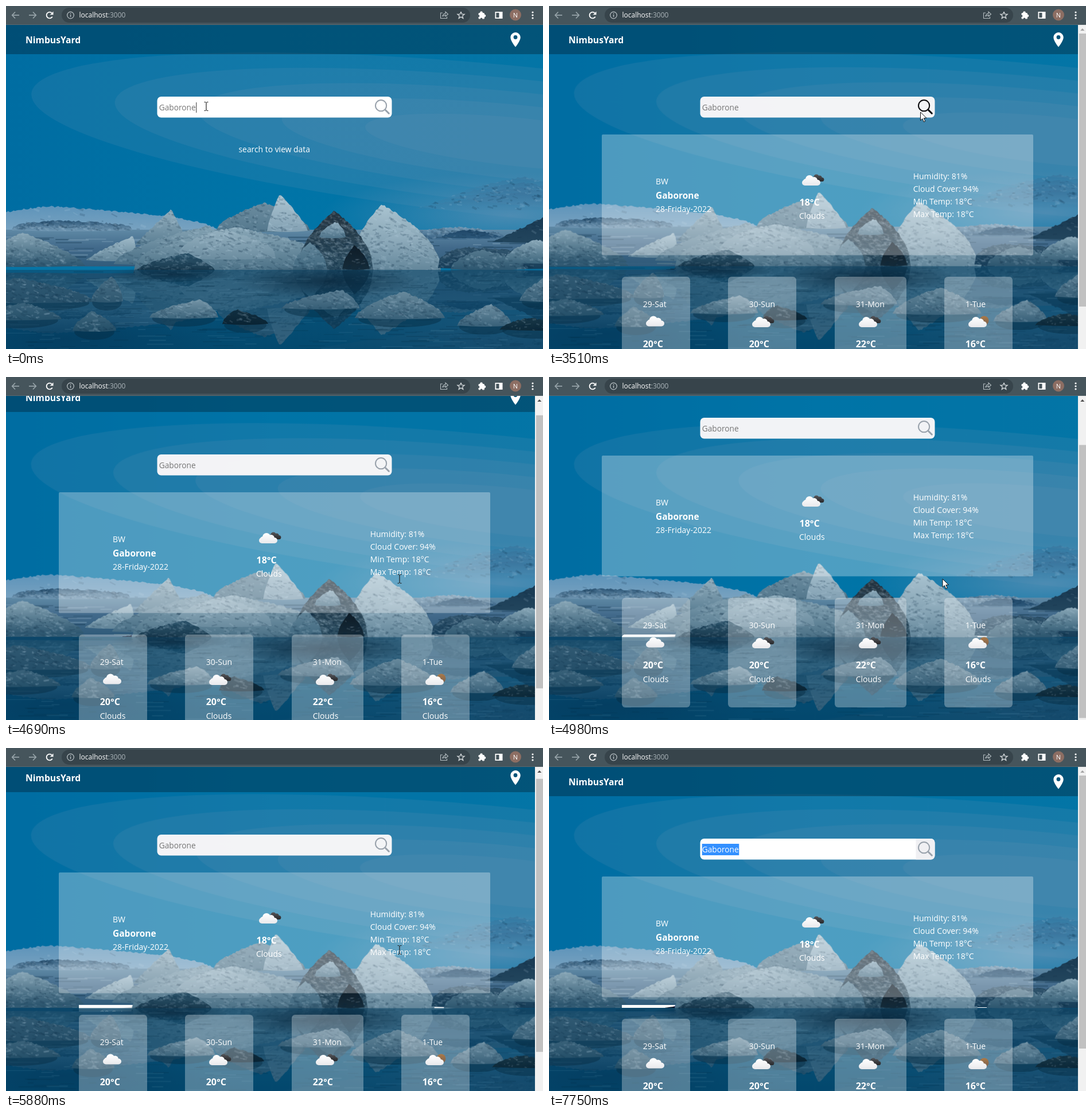
These frames come from a looping animation (936 px wide and 598 px high, 8 s). An HTML page with a canvas:

```html
<!DOCTYPE html>
<html lang="en">
<head>
<meta charset="utf-8">
<title>Weather search</title>
<style>
html, body { margin: 0; width: 100%; height: 100%; overflow: hidden; background: #0674a5; }
canvas { display: block; width: 100vw; height: 100vh; }
</style>
</head>
<body>
<canvas id="stage" width="936" height="598"></canvas>
<script>
const W = 936, H = 598, BAR = 33, LOOP = 8000, STEP = 120;
const stage = document.getElementById('stage').getContext('2d');
const FONT = '"Open Sans", "Noto Sans", sans-serif';
let c = stage;

// ---------- helpers ----------
let seed = 7;
const rnd = () => (seed = (seed * 16807) % 2147483647) / 2147483647;

function grad(x0, y0, x1, y1, ...colors) {
  const g = c.createLinearGradient(x0, y0, x1, y1);
  colors.forEach((col, i) => g.addColorStop(i / (colors.length - 1), col));
  return g;
}
function rect(x, y, w, h, fill, r = 0) {
  c.fillStyle = fill;
  c.beginPath();
  c.roundRect(x, y, w, h, r);
  c.fill();
}
function disc(x, y, r, fill) {
  c.fillStyle = fill;
  c.beginPath();
  c.arc(x, y, r, 0, 7);
  c.fill();
}
function ring(x, y, r, color, width, from = 0, to = 7) {
  c.strokeStyle = color;
  c.lineWidth = width;
  c.beginPath();
  c.arc(x, y, r, from, to);
  c.stroke();
}
function oval(x, y, rx, ry, fill, tilt = 0) {
  c.fillStyle = fill;
  c.beginPath();
  c.ellipse(x, y, rx, ry, tilt, 0, 7);
  c.fill();
}
function text(s, x, y, size = 14, fill = '#fff', weight = 400, align = 'left') {
  c.font = `${weight} ${size}px ${FONT}`;
  c.textAlign = align;
  c.fillStyle = fill;
  c.fillText(s, x, y);
}
function trace(p) {
  c.beginPath();
  for (let i = 0; i < p.length; i += 2) c.lineTo(p[i], p[i + 1]);
}
function line(color, width, ...p) {
  c.strokeStyle = color;
  c.lineWidth = width;
  trace(p);
  c.stroke();
}
function poly(fill, ...p) {
  c.fillStyle = fill;
  trace(p);
  c.fill();
}

// ---------- landscape ----------
// Ice colour from deep water blue (0) to pale snow (1).
function tone(k) {
  const mix = (a, b) => Math.round(a + (b - a) * k);
  return `rgb(${mix(10, 188)},${mix(56, 211)},${mix(84, 223)})`;
}
const shade = k => typeof k === 'number' ? tone(k) : k;

// A rough hump rising from both ends of its base to the apex; bend < 1 rounds it.
function berg(x0, x1, base, ax, ay, bend, top, low, grain = 1) {
  c.save();
  c.beginPath();
  c.moveTo(x0, base);
  for (let x = x0; x <= x1; x += 3) {
    const u = x < ax ? (x - x0) / (ax - x0) : (x1 - x) / (x1 - ax);
    c.lineTo(x, base - (base - ay) * u ** bend + (rnd() - .5) * 3);
  }
  c.lineTo(x1, base);
  c.quadraticCurveTo((x0 + x1) / 2, base + 4, x0, base);
  c.fillStyle = grad(0, ay, 0, base, shade(top), shade(low));
  c.fill();
  c.clip();
  const n = grain * (x1 - x0) * (base - ay) / 45;
  for (let i = 0; i < n; i++) {
    const x = x0 + rnd() * (x1 - x0), y = ay + rnd() * (base - ay), s = 2 + rnd() * 8;
    line(rnd() < .45 ? 'rgba(200,222,234,.13)' : 'rgba(10,42,62,.16)', 1 + rnd() * 3,
      x, y, x + s, y + s * (rnd() - .3));
  }
  c.restore();
}
function glow(x, y, rx, ry, rgb, alpha) {
  c.save();
  c.translate(x, y);
  c.scale(rx, ry);
  const g = c.createRadialGradient(0, 0, 0, 0, 0, 1);
  g.addColorStop(0, `rgba(${rgb},${alpha})`);
  g.addColorStop(1, `rgba(${rgb},0)`);
  c.fillStyle = g;
  c.fillRect(-1, -1, 2, 2);
  c.restore();
}
function streaks(n, y0, y1, light, dark) {
  for (let i = 0; i < n; i++) {
    const x = rnd() * W - 20, y = y0 + rnd() * (y1 - y0);
    line(rnd() < .4 ? light : dark, 1 + rnd() * 1.5, x, y, x + 10 + rnd() * 45, y);
  }
}
function sky() {
  rect(0, 33, W, 420, grad(0, 0, W, 0, '#006da2', '#0074a7', '#0475a6'));
  for (let i = 0; i < 5; i++) {
    const k = 1 - .17 * i;
    oval(900, 238, 860 * k, 132 * k, 'rgba(108,146,180,.155)', .1);
  }
  glow(880, 365, 330, 75, '96,146,182', .75);
  for (let i = 0; i < 4; i++)
    berg(715 + i * 25, 1000, 354 - i * 9, 900, 325 - i * 9, .7, 'rgba(52,102,142,.35)', 'rgba(70,122,160,.15)', .3);
  berg(-80, 372, 402, 70, 349, .35, '#5e94ba', '#7fa6c2', .1);
}
function shore() {
  rect(0, 390, W, 64, grad(0, 390, 0, 454, '#5f89a5', '#41698a', '#315c7b'));
  berg(10, 220, 391, 95, 374, .3, '#2f5879', '#6c93af', 2);
  berg(690, 868, 405, 790, 385, .35, '#7298b3', '#3d6788', 2);
  berg(760, 862, 403, 805, 390, .6, '#1f4667', '#2a5577');
  berg(848, 1010, 411, 960, 358, 1, '#173750', '#22455d', .3);
  streaks(130, 402, 448, 'rgba(160,190,210,.3)', 'rgba(15,50,75,.4)');
}
function bergs() {
  berg(-70, 138, 453, 30, 395, .7, .72, .2);
  berg(140, 230, 443, 222, 401, .8, .85, .5);
  berg(224, 320, 416, 288, 354, 1, .78, .45);
  berg(366, 530, 392, 450, 343, .6, .55, .42);
  berg(455, 526, 392, 477, 327, .8, .92, .68);
  berg(188, 420, 450, 352, 383, .6, .7, .35);
  berg(222, 580, 466, 400, 386, .4, .72, .34);
  berg(300, 470, 440, 375, 390, .4, .78, .55);
  berg(222, 365, 465, 315, 431, .6, '#2e566d', '#16364a', 2);
  berg(600, 758, 461, 655, 346, .5, .9, .55);
  berg(606, 757, 461, 700, 389, .5, .82, .5);
  berg(508, 640, 461, 572, 357, .5, '#26343f', '#2f5266', 4);
  berg(500, 560, 461, 530, 412, .5, .5, .3);
  berg(546, 592, 403, 575, 376, .5, .75, .4);
  berg(586, 634, 458, 608, 417, .6, '#0e1b26', '#152b39');
  berg(753, 980, 457, 800, 420, .3, '#34576f', '#183f5a', 2);
  berg(775, 904, 459, 830, 425, .5, .42, .2);
  berg(868, 990, 447, 925, 407, .5, .72, .3);
}
// Mirror the land at the waterline, then tint it.
function water(cv) {
  const edge = 460 - BAR, span = 165;
  c.save();
  c.setTransform(1, 0, 0, -1, 0, 2 * edge);
  c.drawImage(cv, 0, edge - span, W, span, 0, edge - span, W, span);
  c.restore();
  rect(0, 460, W, 170, grad(0, 460, 0, 600, 'rgba(14,72,106,.6)', 'rgba(8,66,100,.72)', 'rgba(5,56,88,.72)'));
  glow(560, 480, 160, 30, '9,35,55', .7);
  glow(290, 468, 110, 14, '9,35,55', .6);
  glow(100, 580, 260, 60, '4,58,92', .7);
  streaks(320, 462, 615, 'rgba(110,160,188,.13)', 'rgba(4,42,68,.2)');
}
function floe(x0, x1, base, ax, ay, top = .5, low = .25) {
  oval((x0 + x1) / 2, base + 2, (x1 - x0) * .46, 14, 'rgba(6,42,66,.45)');
  berg(x0, x1, base, ax, ay, .6, top, low, 1.2);
}
function floes() {
  floe(-90, 155, 516, 20, 474, .22, .15);
  floe(148, 204, 515, 185, 471, .36, .2);
  floe(-60, 97, 546, 30, 517, .27, .16);
  floe(116, 192, 566, 150, 532, .3, .14);
  floe(250, 370, 543, 338, 511, .6, .3);
  floe(377, 457, 554, 400, 529, '#123041', '#0a2434');
  floe(480, 616, 527, 585, 495, .46, .25);
  floe(608, 765, 544, 692, 498, .52, .27);
  floe(786, 882, 557, 845, 520, .56, .27);
  floe(860, 990, 564, 910, 543, '#183747', '#0d2a3a');
  floe(895, 1000, 514, 945, 471, .48, .25);
}
function paintPhoto() {
  const cv = document.createElement('canvas');
  cv.width = W;
  cv.height = 590;
  c = cv.getContext('2d');
  c.translate(0, -BAR);
  sky(); shore(); bergs(); water(cv); floes();
  c = stage;
  return cv;
}
const photo = paintPhoto();

// ---------- browser bar ----------
function arrow(x, d) {
  line('#98a5ab', 1.7, x - 6 * d, 16, x + 6 * d, 16);
  line('#98a5ab', 1.7, x + d, 10.5, x + 6.3 * d, 16, x + d, 21.5);
}
function toolbar() {
  const soft = '#b3bcc0';
  rect(0, 0, W, BAR, '#46555c');
  rect(0, 32, W, 1, '#5b686e');
  rect(97, 3, 712, 26, '#37444b', 13);
  arrow(17, -1);
  arrow(46, 1);
  ring(76, 16, 5.4, '#fff', 1.9, .5, 5.5);
  poly('#fff', 82.5, 9.5, 82.5, 15.3, 76.7, 15.3);
  ring(112.5, 16, 5.8, soft, 1.3);
  rect(111.8, 15, 1.5, 4.2, soft);
  rect(111.8, 12.3, 1.5, 1.6, soft);
  text('localhost', 127.5, 20, 12);
  text(':3000', 127.5 + c.measureText('localhost').width, 20, 12, '#aab4b9');
  line(soft, 1.1, 761, 12, 757.5, 12, 757.5, 21.5, 768.5, 21.5, 768.5, 18.5);
  line(soft, 1.1, 760.5, 18, 763, 14, 766, 13, 766, 10, 770.5, 14.2, 766, 18, 766, 15.5, 760.5, 18);
  const star = [];
  for (let i = 0; i <= 10; i++) {
    const r = i % 2 ? 2.8 : 6.4, a = i * Math.PI / 5 - Math.PI / 2;
    star.push(793 + r * Math.cos(a), 16.3 + r * Math.sin(a));
  }
  line('#d5dadc', 1.3, ...star);
  rect(823.5, 12, 10.5, 10.5, '#fff', 1.5);
  disc(828.5, 11.5, 2.3, '#fff');
  disc(834, 17, 2.3, '#fff');
  disc(823.6, 17.4, 1.8, '#46555c');
  disc(828.6, 22.4, 1.8, '#46555c');
  c.strokeStyle = '#fff';
  c.lineWidth = 1.8;
  c.strokeRect(853.4, 10.9, 11.2, 10.2);
  rect(859.5, 10.5, 5.5, 11, '#fff');
  disc(888, 15.5, 10, '#8d6e63');
  text('N', 888, 19.5, 11, '#fff', 400, 'center');
  for (const y of [11, 16, 21]) disc(918, y, 1.6, '#fff');
}

// ---------- page ----------
function header() {
  rect(0, 33, W, 51, 'rgba(0,12,22,.31)');
  text('NimbusYard', 34, 65, 15.7, '#fff', 700);
  c.fillStyle = '#fff';
  c.beginPath();
  c.arc(888, 54.7, 8.7, Math.PI * .9, Math.PI * 2.1);
  c.quadraticCurveTo(894, 64, 888, 71.5);
  c.quadraticCurveTo(882, 64, 879.7, 57.4);
  c.closePath();
  c.moveTo(891.4, 54.5);
  c.arc(888, 54.5, 3.4, 0, Math.PI * 2, true);
  c.fill();
}
function searchBox(s) {
  rect(263.5, 158, 409, 36.5, s.focus ? '#fff' : 'rgba(247,246,248,.98)', 7);
  if (s.done) rect(639.5, 158, 33, 36.5, '#f0f0f3', [0, 7, 7, 0]);
  text('Gaborone', 266.7, 182.3, 13.7, '#757575');
  if (s.select) {
    const x = 331.5 - s.select;
    c.save();
    c.beginPath();
    c.rect(x, 167, s.select, 20);
    c.clip();
    rect(x, 167, s.select, 20, '#3390ff');
    text('Gaborone', 266.7, 182.3, 13.7);
    c.restore();
  }
  if (s.caret) rect(331.3, 168, 1, 18, '#333');
  const ink = s.hover ? '#08080a' : '#98a1ab';
  ring(653.6, 173.7, 9.6, ink, 2);
  c.lineCap = 'round';
  line(ink, 3, 661.5, 181.5, 667.3, 187.2);
  c.lineCap = 'butt';
}
function puff(x, y, k, top, low) {
  const fill = grad(0, y, 0, y + 18 * k, top, low);
  rect(x, y + 8 * k, 32 * k, 10 * k, fill, 5 * k);
  for (const [dx, dy, r] of [[13, 7, 7], [21, 9, 6], [7, 11, 5]]) disc(x + dx * k, y + dy * k, r * k, fill);
}
function weather(x, y, kind) {
  if (kind === 'broken') puff(x + 16, y - 1, .7, '#55565a', '#26272a');
  if (kind === 'sun') disc(x + 27.5, y + 7, 8, grad(0, y, 0, y + 15, '#a87848', '#78604f'));
  puff(x, y + .5, 1, '#fff', '#e9e9ec');
}
const days = [
  [127, 119, '29-Sat', '20°C', 'plain'],
  [312, 119, '30-Sun', '20°C', 'broken'],
  [498, 125, '31-Mon', '22°C', 'broken'],
  [689, 119, '1-Tue', '16°C', 'sun']
];
function report() {
  const glass = 'rgba(255,255,255,.3)';
  rect(92, 224, 752, 210.5, glass, 2);
  text('BW', 186, 311);
  text('Gaborone', 186, 336, 15.5, '#fff', 700);
  text('28-Friday-2022', 186, 358.5);
  weather(441, 294.5, 'broken');
  text('18°C', 436.5, 347.5, 16, '#fff', 700);
  text('Clouds', 436, 371);
  ['Humidity: 81%', 'Cloud Cover: 94%', 'Min Temp: 18°C', 'Max Temp: 18°C']
    .forEach((s, i) => text(s, 634.7, 302 + 22 * i));
  for (const [x, w, day, temp, kind] of days) {
    rect(x, 472, w, 191, glass, 6);
    text(day, x + 36.7, 525);
    weather(x + 42, kind === 'plain' ? 540 : 541.5, kind);
    text(temp, x + 36.7, 595, 16, '#fff', 700);
    text('Clouds', x + 36.7, 618.5);
  }
}
function scrollbar(y) {
  rect(922, BAR, 14, H, '#f1f1f1');
  poly(y ? '#505050' : '#a3a3a3', 926.2, 43, 929.8, 39, 933.4, 43);
  rect(924, 48 + y * .81, 12, 476, '#c1c1c1');
}
function pointer(x, y, beam) {
  if (beam) {
    line('#222', 1.2, x, y - 7, x, y + 7);
    for (const d of [-1, 1])
      line('#222', 1, x - 3.5, y + 7.5 * d, x - 1, y + 7.5 * d, x, y + 6.5 * d, x + 1, y + 7.5 * d, x + 3.5, y + 7.5 * d);
    return;
  }
  const p = [0, 0, 0, 14.5, 3.4, 11.4, 5.8, 17, 8.2, 16, 5.8, 10.5, 10.3, 10.3, 0, 0]
    .map((v, i) => v + (i % 2 ? y : x));
  poly('#fff', ...p);
  line('#111', 1, ...p);
}

// ---------- timeline ----------
const scroll = [[0, 0], [4690, 23], [4980, 87], [5610, 68], [5760, 57], [5880, 7], [6030, 0]];
// Each move: start time, number of steps, where it ends.
const moves = [
  [380, 3, 520, 200], [740, 2, 640, 184], [1160, 2, 647.5, 185], [4140, 1, 647.5, 192],
  [4290, 2, 686, 352], [6780, 4, 499, 178], [7390, 3, 290, 183]
];
function mouseAt(t) {
  let x = 349, y = 175;
  for (const [start, steps, ex, ey] of moves) {
    if (t < start) break;
    const k = Math.min(1, (Math.floor((t - start) / STEP) + 1) / steps);
    x += (ex - x) * k;
    y += (ey - y) * k;
  }
  return [x, y];
}
function overText(x, y) {
  const inField = x > 263 && x < 640 && y > 158 && y < 194;
  return inField || (x > 635 && x < 740 && y > 353 && y < 377);
}

function draw(now) {
  const t = now % LOOP, loaded = t >= 3510, [mx, my] = mouseAt(t);
  const y = scroll.filter(k => k[0] <= t).pop()[1];
  c.save();
  c.translate(0, BAR);
  if (loaded) c.scale(922 / W, 922 / W);
  c.drawImage(photo, 0, 0);
  c.restore();
  c.save();
  c.translate(0, -y);
  header();
  searchBox({
    focus: t < 1160 || t >= 7510,
    caret: t < 380 || (t >= 7510 && t < 7630),
    hover: t >= 860 && t < 4290,
    select: t < 7630 ? 0 : t < 7750 ? 41 : 65,
    done: t >= 7750
  });
  if (loaded) report();
  else text(t < 1280 ? 'search to view data' : 'loading...', 467.7, 255, 13.9, '#fff', 400, 'center');
  c.restore();
  if (loaded) scrollbar(y);
  toolbar();
  if (t < 7750) pointer(mx, my, overText(mx, my + y));
  requestAnimationFrame(draw);
}
requestAnimationFrame(draw);
</script>
</body>
</html>
```
